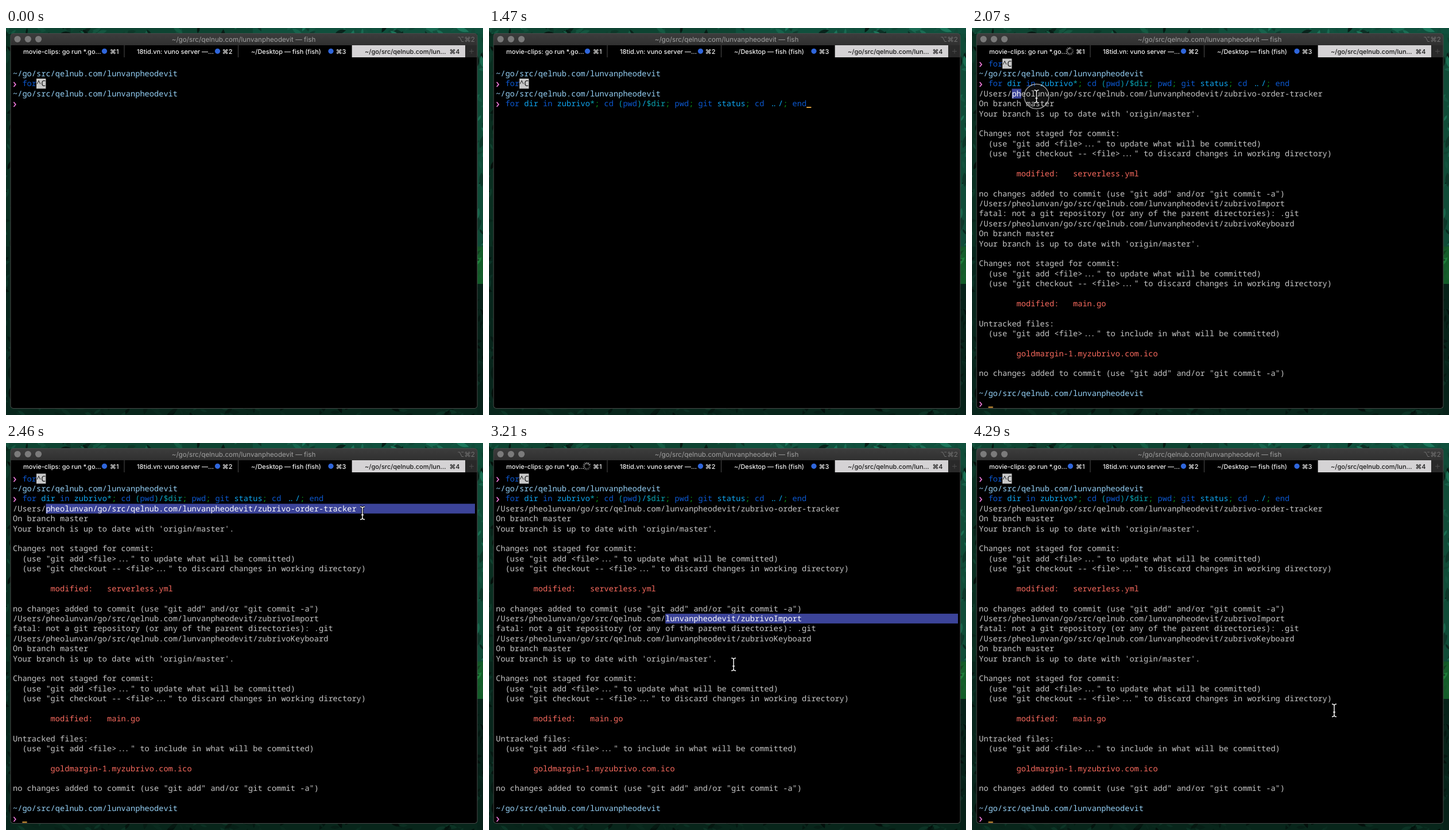
These frames come from a looping animation (831 px wide and 673 px high, 4.32 s). An HTML page with a canvas:

```html
<!DOCTYPE html>
<html lang="en">
<head>
<meta charset="utf-8">
<title>Terminal session</title>
<style>
html, body { margin: 0; width: 100%; height: 100%; overflow: hidden; background: #04251c; }
canvas { display: block; }
</style>
</head>
<body>
<canvas id="stage" width="831" height="673"></canvas>
<script>
const W = 831, H = 673, LOOP = 4320;
const X0 = 12, CELL = 8.2, ROW = 17.38, TOP = 62, RIGHT = 817;
const MONO = '13.667px "Noto Sans Mono", "DejaVu Sans Mono", monospace';
const UI = 'Inter, "DejaVu Sans", sans-serif';

const TEXT = '#c7c7c7', PATH = '#96d2f8', RED = '#fb6b5f';
const CMD = '#0c58d0', ARG = '#0fa6f2', SEP = '#0a9618', OP = '#0aa0ae';
const PROMPT = '#ee78da', CURSOR = '#e0a13c', SELECT = '#3c4499';

const USER = 'lunvanpheodevit';
const REPO = 'go/src/qelnub.com/' + USER;
const HOME = '/Users/pheolunvan/' + REPO + '/';

const plain = s => [[s, TEXT]];
const red = s => [['        ' + s, RED]];
const here = [['~/' + REPO, PATH]];
const aborted = [['  for', CMD], ['^C', '#111']];
const command = [
  ['  for ', CMD], ['dir ', ARG], ['in ', CMD], ['zubrivo', ARG], ['*', OP], ['; ', SEP],
  ['cd ', CMD], ['(', OP], ['pwd', CMD], [')', OP], ['/', ARG], ['$dir', OP], ['; ', SEP],
  ['pwd', CMD], ['; ', SEP], ['git ', CMD], ['status', ARG], ['; ', SEP],
  ['cd ', CMD], ['../', ARG], ['; ', SEP], ['end', CMD]
];

const status = file => [
  'On branch master',
  "Your branch is up to date with 'origin/master'.",
  '',
  'Changes not staged for commit:',
  '  (use "git add <file>..." to update what will be committed)',
  '  (use "git checkout -- <file>..." to discard changes in working directory)',
  ''
].map(plain).concat([red('modified:   ' + file), plain('')]);
const noChanges = plain('no changes added to commit (use "git add" and/or "git commit -a")');

const output = [
  aborted, here, command,
  plain(HOME + 'zubrivo-order-tracker'), ...status('serverless.yml'), noChanges,
  plain(HOME + 'zubrivoImport'),
  plain('fatal: not a git repository (or any of the parent directories): .git'),
  plain(HOME + 'zubrivoKeyboard'), ...status('main.go'),
  plain('Untracked files:'),
  plain('  (use "git add <file>..." to include in what will be committed)'),
  plain(''), red('goldmargin-1.myzubrivo.com.ico'), plain(''),
  noChanges, plain(''), here
];
const length = segs => segs.reduce((n, s) => n + s[0].length, 0);

// Timeline in ms
const TYPE_START = 850, TYPE_END = 1400, RUN = 1620;
const mouseKeys = [
  [1830, 160, 230], [1950, 70, 118], [1980, 70, 118], [2070, 110, 119], [2280, 621, 122],
  [2480, 621, 122], [2720, 309, 309], [2780, 309, 309], [2980, 580, 311], [3060, 580, 311],
  [3210, 426, 385], [3550, 470, 420], [3650, 470, 420], [4150, 631, 465], [4320, 631, 465]
];
const drags = [
  { row: 3, col: 7, press: 1980, release: 2400, clear: 2780 },
  { row: 14, col: 36, press: 2780, release: 3050, clear: 3600 }
];

const ctx = document.getElementById('stage').getContext('2d');

function mouseAt(t) {
  let i = 1;
  while (i < mouseKeys.length - 1 && t > mouseKeys[i][0]) i++;
  const [ta, xa, ya] = mouseKeys[i - 1], [tb, xb, yb] = mouseKeys[i];
  const k = Math.max(0, Math.min(1, (t - ta) / (tb - ta)));
  return { x: xa + (xb - xa) * k, y: ya + (yb - ya) * k };
}

function disc(c, x, y, r, color) {
  c.fillStyle = color;
  c.beginPath();
  c.arc(x, y, r, 0, Math.PI * 2);
  c.fill();
}

function label(c, s, x, y, size, color, weight = 500, align = 'left') {
  c.font = weight + ' ' + size + 'px ' + UI;
  c.textAlign = align;
  c.fillStyle = color;
  c.fillText(s, x, y);
}

function randomizer(seed) {
  return () => (seed = (seed * 16807) % 2147483647) / 2147483647;
}

function leaf(c, x, y, len, angle, color) {
  c.save();
  c.translate(x, y);
  c.rotate(angle);
  c.fillStyle = color;
  c.beginPath();
  c.moveTo(0, 0);
  c.quadraticCurveTo(len / 2, -len / 3, len, 0);
  c.quadraticCurveTo(len / 2, len / 3, 0, 0);
  c.fill();
  c.restore();
}

// Leafy wallpaper: bright at the top right, dark along the bottom
function drawLeaves(c) {
  const rnd = randomizer(71);
  function strip(x, y, w, h, count, hue, light) {
    c.save();
    c.beginPath();
    c.rect(x, y, w, h);
    c.clip();
    c.fillStyle = `hsl(${hue},66%,${light}%)`;
    c.fillRect(x, y, w, h);
    for (let i = 0; i < count; i++) {
      const tone = light * (0.35 + rnd() * 1.15);
      leaf(c, x + rnd() * w, y + rnd() * h, 10 + rnd() * 16, rnd() * 6.28, `hsl(${hue},62%,${tone}%)`);
    }
    c.restore();
  }
  strip(0, 0, 8, 380, 35, 158, 11);
  strip(0, 380, 8, 293, 25, 160, 9);
  strip(8, 661, 813, 12, 70, 158, 9);
  strip(821, 0, 10, 380, 35, 160, 18);
  strip(821, 380, 10, 65, 9, 138, 22);
  strip(821, 445, 10, 228, 20, 160, 8);
  strip(0, 0, 430, 10, 40, 160, 16);
  strip(430, 0, 401, 10, 40, 162, 19);
}

function drawWindow(c) {
  c.fillStyle = '#000';
  c.beginPath();
  c.roundRect(8, 9.5, 813, 652, 5);
  c.fill();
  c.save();
  c.clip();
  const g = c.createLinearGradient(0, 9, 0, 30);
  g.addColorStop(0, '#3d3d3d');
  g.addColorStop(1, '#303030');
  c.fillStyle = g;
  c.fillRect(8, 9, 813, 21);
  c.fillStyle = '#d5d3d5';
  c.fillRect(603, 30, 197, 21);
  c.fillStyle = '#292929';
  c.fillRect(800, 30, 21, 21);
  c.fillStyle = '#4c4c4c';
  for (const x of [205.5, 404, 602]) c.fillRect(x, 30, 1, 21);
  c.fillRect(807, 40, 8, 1);
  c.fillRect(810.5, 36.5, 1, 8);
  c.restore();
  c.strokeStyle = '#484b49';
  c.lineWidth = 1;
  c.beginPath();
  c.roundRect(8, 9.5, 813, 652, 5);
  c.stroke();

  for (const x of [20, 38.3, 56.5]) disc(c, x, 19.3, 5.6, '#7b7b7b');
  label(c, '~/' + REPO + ' — fish', 414, 24, 11.7, '#a2a2a2', 400, 'center');
  label(c, '⌥⌘2', 817, 24, 11.7, '#727272', 400, 'right');

  const tabs = [
    [30, 'movie-clips: go run *.go…'], [228, '18tid.vn: vuno server —…'],
    [427, '~/Desktop — fish (fish)'], [625, '~/' + REPO.slice(0, 21) + '…']
  ];
  tabs.forEach(([x, s], i) => {
    const color = i === 3 ? '#161616' : '#f2f2f2';
    label(c, s, x, 45, 11, color);
    label(c, '⌘' + (i + 1), 196.5 + i * 198, 45, 11, color, 500, 'right');
  });
  disc(c, 368.5, 40.3, 4.6, '#2f66dc');
  disc(c, 566, 40.3, 4.6, '#2f66dc');
}

function drawActivity(t) {
  const busy = (t - 500 + 1290) % 1290 < 500;
  if (!busy) return disc(ctx, 171.5, 40.3, 4.6, '#2f66dc');
  const head = Math.floor(t / 30);
  ctx.lineWidth = 1.3;
  for (let i = 0; i < 12; i++) {
    const a = i * Math.PI / 6, fade = (head - i + 1200) % 12 / 12;
    ctx.strokeStyle = `rgba(225,225,225,${0.95 - fade * 0.7})`;
    ctx.beginPath();
    ctx.moveTo(170.5 + Math.cos(a) * 3.6, 40.3 + Math.sin(a) * 3.6);
    ctx.lineTo(170.5 + Math.cos(a) * 7, 40.3 + Math.sin(a) * 7);
    ctx.stroke();
  }
}

const rowY = r => TOP + r * ROW;

function drawRow(r, segs, limit = Infinity, sel) {
  const y = rowY(r), s = segs.map(p => p[0]).join('');
  if (sel) {
    const x = X0 + sel.from * CELL;
    const end = sel.to > s.length ? RIGHT : X0 + sel.to * CELL;
    ctx.fillStyle = SELECT;
    ctx.fillRect(x, y - 8.5, end - x, 17);
  }
  ctx.font = MONO;
  ctx.textAlign = 'left';
  let col = 0;
  for (const [part, color] of segs) {
    for (const ch of part) {
      if (col >= limit) return;
      // Runs of dots are set tighter, as in a coding ligature
      let dx = 0;
      if (ch === '.') dx = ((s[col + 1] === '.') - (s[col - 1] === '.')) * 2.4;
      const lit = sel && col >= sel.from && col < sel.to;
      ctx.fillStyle = lit ? '#fff' : color;
      if (ch !== ' ') ctx.fillText(ch, X0 + col * CELL + dx, y + 4.7);
      col++;
    }
  }
}

function drawPrompt(r) {
  const y = rowY(r);
  ctx.strokeStyle = PROMPT;
  ctx.lineWidth = 1.7;
  ctx.beginPath();
  ctx.moveTo(13.4, y - 2.7);
  ctx.lineTo(16.8, y + 1.4);
  ctx.lineTo(13.4, y + 5.5);
  ctx.stroke();
}

function drawAborted(r) {
  ctx.fillStyle = '#c9c9c9';
  ctx.fillRect(X0 + 5 * CELL, rowY(r) - 8.7, 2 * CELL, 17.4);
  drawRow(r, aborted);
  drawPrompt(r);
}

function drawCursor(t, r, col) {
  const phase = t % 320;
  if (phase < 95 || phase >= 255) return;
  ctx.fillStyle = CURSOR;
  ctx.fillRect(X0 + col * CELL, rowY(r) + 5.5, CELL, 2);
}

function drawMouse(t) {
  if (t < mouseKeys[0][0]) return;
  const { x, y } = mouseAt(t);
  if (drags.some(d => t >= d.press && t < d.release)) {
    disc(ctx, x, y, 21.5, 'rgba(255,255,255,.06)');
    ctx.strokeStyle = 'rgba(205,205,205,.75)';
    ctx.lineWidth = 1.3;
    ctx.beginPath();
    ctx.arc(x, y, 21.5, 0, Math.PI * 2);
    ctx.stroke();
  }
  ctx.beginPath();
  for (const d of [-1, 1]) {
    ctx.moveTo(x - 4, y + d * 11);
    ctx.quadraticCurveTo(x, y + d * 11, x, y + d * 8);
    ctx.quadraticCurveTo(x, y + d * 11, x + 4, y + d * 11);
  }
  ctx.moveTo(x, y - 8);
  ctx.lineTo(x, y + 8);
  ctx.moveTo(x - 2, y + 3);
  ctx.lineTo(x + 2, y + 3);
  ctx.strokeStyle = '#000';
  ctx.lineWidth = 3.4;
  ctx.stroke();
  ctx.strokeStyle = '#f4f4f4';
  ctx.lineWidth = 1.5;
  ctx.stroke();
}

function drawTyping(t) {
  const total = length(command) - 2;
  const k = Math.max(0, Math.min(1, (t - TYPE_START) / (TYPE_END - TYPE_START)));
  const cols = 2 + Math.floor(total * k);
  drawRow(1, here);
  drawAborted(2);
  drawRow(3, here);
  drawPrompt(4);
  drawRow(4, command, cols);
  drawCursor(t, 4, cols);
}

function drawOutput(t) {
  const drag = drags.find(d => t >= d.press && t < d.clear);
  let sel;
  if (drag) {
    const x = mouseAt(Math.min(t, drag.release) - 50).x;
    sel = { from: drag.col, to: Math.max(drag.col, Math.floor((x - X0) / CELL)) };
  }
  drawAborted(0);
  for (let r = 1; r < output.length; r++) {
    drawRow(r, output[r], Infinity, drag && drag.row === r ? sel : undefined);
  }
  drawPrompt(2);
  drawPrompt(output.length);
  drawCursor(t, output.length, 2);
}

const backdrop = document.createElement('canvas');
backdrop.width = W;
backdrop.height = H;
const back = backdrop.getContext('2d');
back.textRendering = ctx.textRendering = 'geometricPrecision';
drawLeaves(back);
drawWindow(back);

function render(t) {
  ctx.drawImage(backdrop, 0, 0);
  drawActivity(t);
  if (t < RUN) drawTyping(t);
  else drawOutput(t);
  drawMouse(t);
}

const start = performance.now();
function tick() {
  render((performance.now() - start) % LOOP);
  requestAnimationFrame(tick);
}
tick();
</script>
</body>
</html>
```
